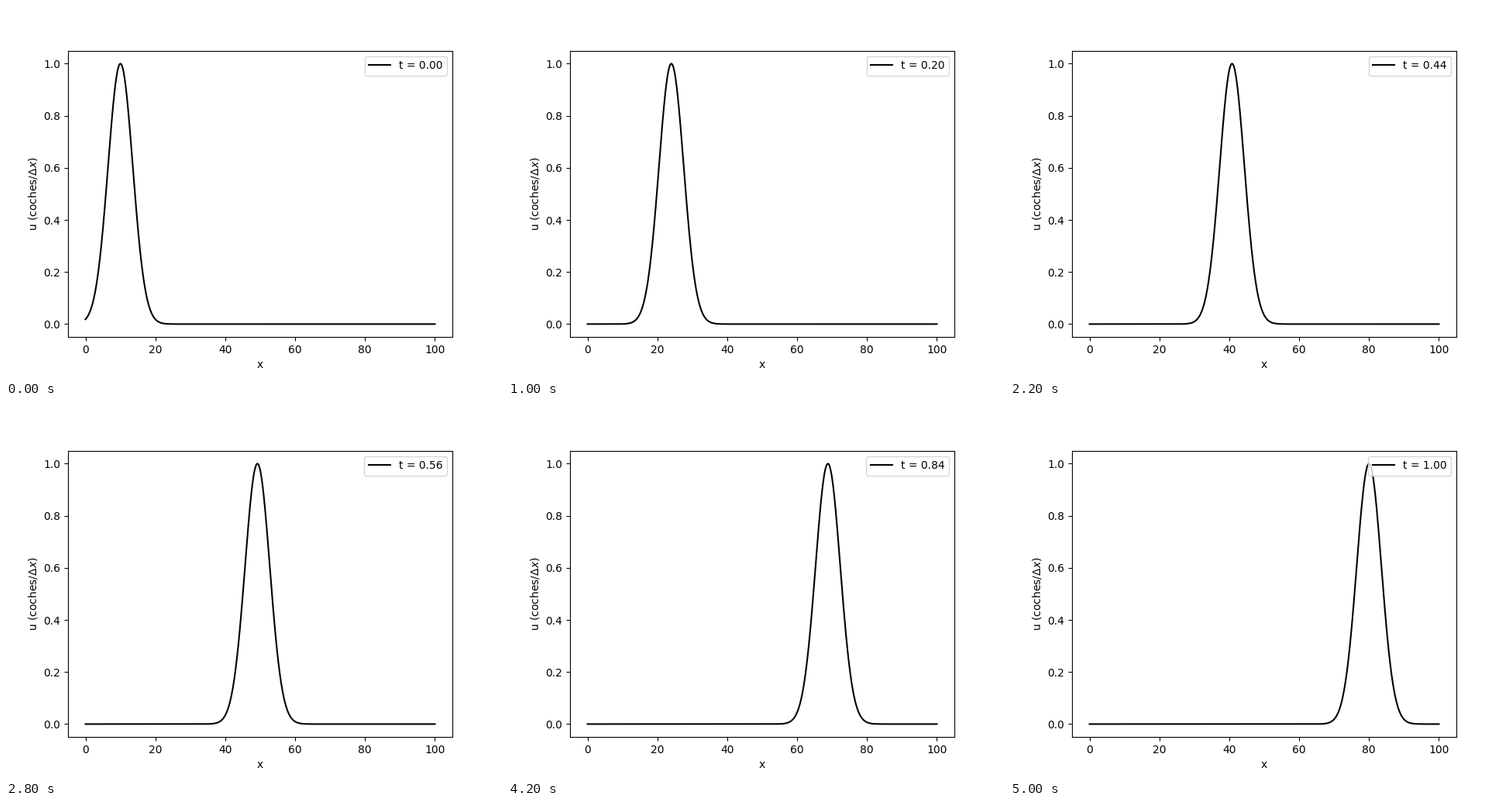
Animation of 640x480 px, one loop 5100 ms. Source, as a matplotlib script:

```python
import numpy as np
import matplotlib.pyplot as plt
from matplotlib.animation import FuncAnimation

FRAMES = 51
INTERVAL = 100  # ms
DT = 0.02       # simulated time per frame
SPEED = 70
START = 10
WIDTH = 5

x = np.linspace(0, 100, 1001)


def density(t):
    """Gaussian pulse carried along at constant speed."""
    return np.exp(-((x - START - SPEED * t) / WIDTH) ** 2)


fig, ax = plt.subplots(figsize=(6.4, 4.8), dpi=100)
line, = ax.plot(x, density(0), color="black", lw=1.5)
ax.set_xlim(-5, 105)
ax.set_ylim(-0.05, 1.05)
ax.set_xlabel("x")
ax.set_ylabel(r"u (coches/$\Delta x$)")
legend = ax.legend([line], ["t = 0.00"], loc="upper right")
label = legend.get_texts()[0]


def update(frame):
    t = frame * DT
    line.set_ydata(density(t))
    label.set_text(f"t = {t:.2f}")
    return line, legend


anim = FuncAnimation(fig, update, frames=FRAMES, interval=INTERVAL,
                     repeat=True, repeat_delay=0, blit=False)
plt.show()
```
